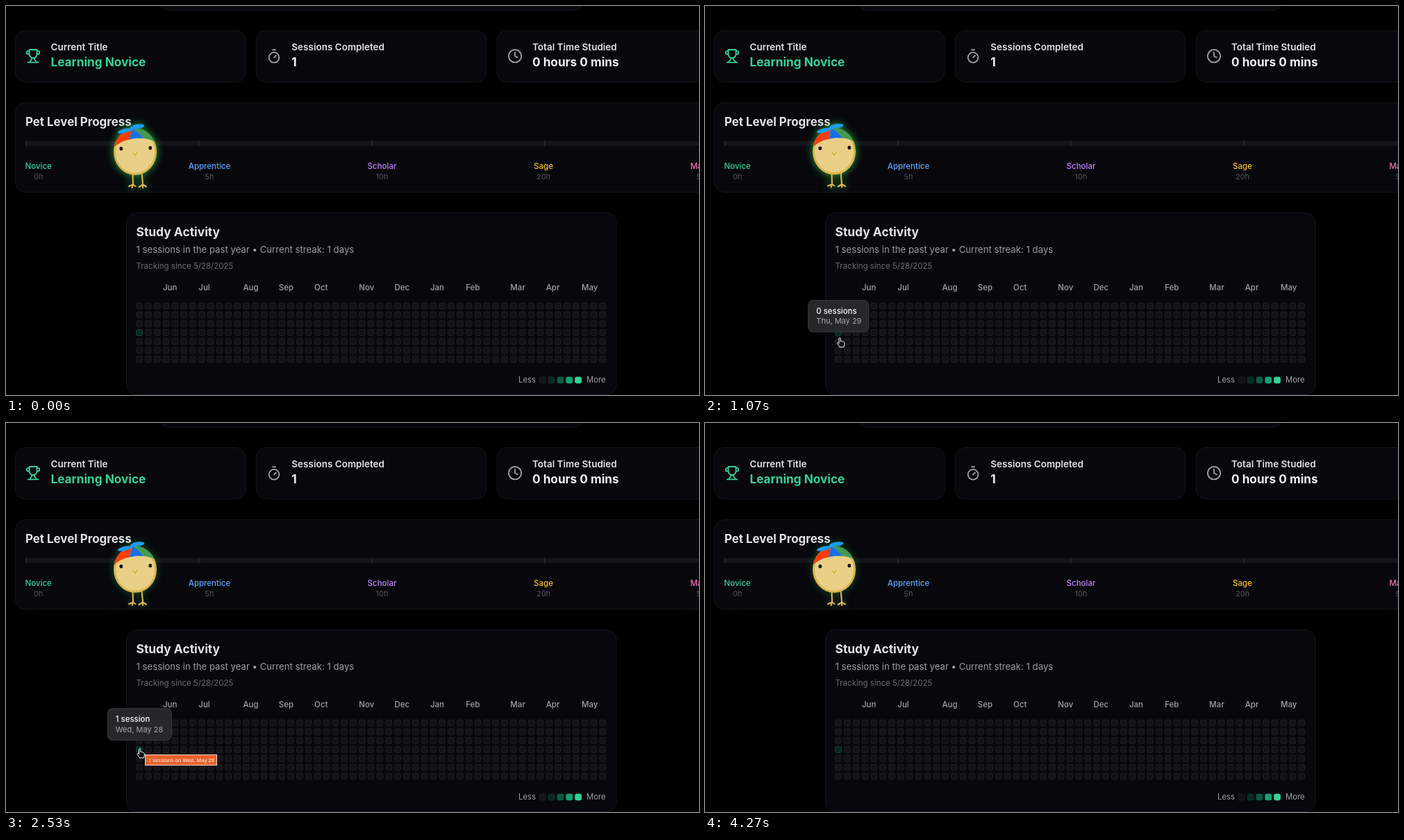
An HTML page for the animation above (4.3 s loop, 998x561 px).

```html
<!DOCTYPE html>
<html lang="en">
<head>
<meta charset="utf-8">
<title>Study dashboard</title>
<style>
  html, body { margin: 0; width: 100%; height: 100%; overflow: hidden; background: #000; }
  svg { display: block; width: 998px; height: 561px; }
  text { font-family: Inter, "Open Sans", sans-serif; white-space: pre; }
  .card { fill: #07070c; stroke: #15151d; }
  .icon { fill: none; stroke-width: 2; stroke-linecap: round; stroke-linejoin: round; }
</style>
</head>
<body>
<svg id="stage" viewBox="0 0 998 561">
  <g id="cards"></g>
  <g id="icons">
    <g class="icon" stroke="#34d399" transform="translate(28 61.2) scale(.92)">
      <path d="M6 9H4.5a2.5 2.5 0 0 1 0-5H6M18 9h1.5a2.5 2.5 0 0 0 0-5H18M4 22h16M10 14.7V17c0 .5-.5 1-1 1.2C7.9 18.8 7 20.2 7 22M14 14.7V17c0 .5.5 1 1 1.2 1.1.6 2 2 2 3.8M18 2H6v7a6 6 0 0 0 12 0Z"/>
    </g>
    <g class="icon" stroke="#a1a1aa" transform="translate(375 61.4) scale(.92)">
      <path d="M10 2h4M12 14l3-3"/><circle cx="12" cy="14" r="8"/>
    </g>
    <g class="icon" stroke="#a1a1aa" transform="translate(722 61.2) scale(.92)">
      <path d="M12 6v6l4 2"/><circle cx="12" cy="12" r="10"/>
    </g>
  </g>
  <g id="labels"></g>
  <g id="grid"></g>

  <g id="pet">
    <g fill="none" stroke="#dcb54c" stroke-width="2.1" stroke-linecap="round" stroke-linejoin="round">
      <path d="M182.5 242L183 258.500M177 261L183 258.500L181.500 263M183 258.500L186.500 261"/>
      <path d="M195.500 241L197 258.500M191.500 262L197 258.500V263M197 258.500L202 261.500"/>
    </g>
    <ellipse cx="186" cy="211.300" rx="29.500" ry="32" fill="#e9d086" stroke="#d9b650" stroke-width="3"/>
    <path d="M155.800 204.500A31 33.500 0 0 1 182 177.700C180 183 179 188 178 193.500C169 195 162 199 155.800 204.500Z" fill="#fb3d0c"/>
    <path d="M182 177.700C180 183 179 188 178 193.500C185 191.500 191 191.300 198 192C194 185.500 189 181 182 177.700Z" fill="#1670e4"/>
    <path d="M182 177.700A31 33.500 0 0 1 213.800 196.500C209 193.700 204 192.500 198 192C194 185.500 189 181 182 177.700Z" fill="#449a50"/>
    <g fill="#1b9cf2">
      <ellipse cx="171" cy="181" rx="10.500" ry="3" transform="rotate(-14 171 181)"/>
      <ellipse cx="189.500" cy="174.700" rx="10" ry="3.200" transform="rotate(-8 189.500 174.700)"/>
      <circle cx="181" cy="177.500" r="2.300"/>
    </g>
    <ellipse cx="165.800" cy="206.800" rx="2.400" ry="2.700" fill="#161310"/>
    <ellipse cx="207.800" cy="205.800" rx="2.400" ry="2.700" fill="#161310"/>
    <path d="M183 213L185.800 216.500L188.700 212.700" fill="none" stroke="#d9ae43" stroke-width="1.600" stroke-linecap="round"/>
  </g>

  <g id="tip">
    <rect id="tipBox" height="45.500" rx="7" fill="#29292c" fill-opacity=".96" stroke="#3d3d42"/>
    <text id="tipHead" x="11.500" y="19.300" font-size="11.4" font-weight="500" fill="#fafafa"></text>
    <text id="tipDate" x="11.500" y="33.800" font-size="11" fill="#a7a7ae"></text>
  </g>
  <g id="hint">
    <rect x="200.500" y="478.500" width="103" height="15" fill="#e7632f" stroke="#f6d6c6"/>
    <text x="204.800" y="488.800" font-size="7.6" fill="#fff" style="font-family:'Noto Sans','Open Sans',sans-serif">1 sessions on Wed, May 28</text>
  </g>
  <g id="cursor" stroke="#fff" fill="#0a0a0a" stroke-linejoin="round">
    <path id="arrow" d="M0 0V11.500L2.700 9L4.500 13L6.300 12.200L4.500 8.300H8Z"/>
    <path id="hand" d="M-2-4.500C-2-6 .1-6 .2-4.500V-.3C.9-1.200 2-.9 2.200 0C3-.6 4-.2 4.200.6C5.100.3 5.800.9 5.800 1.900V4.500C5.800 6 4.800 6.500 4.800 8H-1.200C-1.500 6.200-4 4-4.600 2.600C-5 1.400-3.500.9-2.700 1.900L-2 2.700Z"/>
  </g>
</svg>
<script>
const NS = 'http://www.w3.org/2000/svg';
const LOOP = 4300;
const $ = id => document.getElementById(id);

function add(parent, tag, attrs, content) {
  const node = document.createElementNS(NS, tag);
  for (const key in attrs) node.setAttribute(key, attrs[key]);
  if (content) node.textContent = content;
  parent.append(node);
  return node;
}

function label(content, x, y, size, weight, fill, anchor = 'start') {
  add($('labels'), 'text', { x, y, 'font-size': size, 'font-weight': weight, fill, 'text-anchor': anchor }, content);
}

function card(x, y, width, height) {
  add($('cards'), 'rect', { class: 'card', x, y, width, height, rx: 14 });
}

card(220, -60, 612, 66);
for (let i = 0; i < 3; i++) card(13.5 + i * 346.8, 35.5, 331.5, 74);
card(13.5, 139.5, 1025, 129);
card(173.5, 298.5, 705.5, 262);

add($('cards'), 'rect', { x: 28, y: 195, width: 990, height: 6.5, rx: 3, fill: '#15151a' });
for (let i = 0; i < 4; i++)
  add($('cards'), 'rect', { x: 27.8 + i * 249, y: 194.3, width: 1.8, height: 8, fill: '#26262b' });

const stats = [
  ['Current Title', 'Learning Novice', 64.5, '#34d399'],
  ['Sessions Completed', '1', 411.3, '#f1f1f3'],
  ['Total Time Studied', '0 hours 0 mins', 758, '#f1f1f3']
];
for (const [name, value, x, fill] of stats) {
  label(name, x, 64, 13.5, 600, '#e4e4e7');
  label(value, x, 87.2, 17.2, 700, fill);
}

label('Pet Level Progress', 28, 172.7, 16.9, 700, '#e4e4e7');
const levels = [
  ['Novice', '0h', 46.7, '#34d399'],
  ['Apprentice', '5h', 293, '#60a5fa'],
  ['Scholar', '10h', 541.5, '#c084fc'],
  ['Sage', '20h', 774, '#fbbf24'],
  ['Master', '50h', 1004.5, '#f472b6']
];
for (const [name, hours, x, fill] of levels) {
  label(name, x, 235, 11.5, 500, fill, 'middle');
  label(hours, x, 249.5, 11, 400, '#55555e', 'middle');
}

label('Study Activity', 187.5, 331.5, 17.4, 700, '#e4e4e7');
label('1 sessions in the past year • Current streak: 1 days', 187.5, 355.5, 13.2, 400, '#9d9da6');
label('Tracking since 5/28/2025', 187.5, 379, 11.5, 400, '#6b6b74');

const STEP = 12.83;
const months = { Jun: 3, Jul: 7, Aug: 12, Sep: 16, Oct: 20, Nov: 25, Dec: 29, Jan: 33, Feb: 37, Mar: 42, Apr: 46, May: 50 };
for (const name in months) label(name, 187.5 + STEP * months[name], 409.7, 11.5, 500, '#a1a1aa');

function cell(cx, cy, fill, stroke) {
  add($('grid'), 'rect', { x: cx - 4.4, y: cy - 4.4, width: 8.8, height: 8.8, rx: 2, fill, stroke, 'stroke-width': .9 });
}
for (let col = 0; col < 53; col++)
  for (let row = 0; row < 7; row++) {
    const active = col === 0 && row === 3;
    cell(192 + col * STEP, 432.6 + row * 12.8, active ? '#052a20' : '#141417', active ? '#0c513b' : '#232327');
  }

label('Less', 738, 543.3, 11.3, 400, '#a1a1aa');
label('More', 836, 543.3, 11.3, 400, '#a1a1aa');
['#141417', '#06291f', '#0a5a43', '#10a574', '#34d399'].forEach((fill, i) =>
  cell(772.7 + i * 12.85, 539.5, fill, ['#232327', '#0b3d2e', '#0c6049', '#10a574', '#34d399'][i]));

// [time, values...]
const pointerPath = [
  [110, 905, 575], [300, 848, 486], [430, 714.5, 502], [650, 455, 501],
  [900, 212, 489], [1070, 195, 484], [1300, 195, 483], [1450, 194.5, 475],
  [1630, 194.5, 475], [2100, 193.5, 475], [2850, 193.5, 475], [3130, 150, 575]
];
const petPath = [[0, -1, .85], [430, -2, .9], [1070, -1.5, .85], [1630, 0, .6], [2530, 0, .4], [4300, 0, .4]];

// [from, to, centre, top, width, heading, date]
const tips = [
  [270, 490, 846.4, 424.5, 83, '0 sessions', 'Thu, May 21'],
  [960, 1380, 192.3, 424.5, 87, '0 sessions', 'Thu, May 29'],
  [1380, 2900, 192.3, 411.8, 92, '1 session', 'Wed, May 28']
];

function along(path, t) {
  if (t <= path[0][0]) return path[0].slice(1);
  for (let i = 1; i < path.length; i++) {
    const a = path[i - 1], b = path[i];
    if (t <= b[0]) {
      const k = (t - a[0]) / (b[0] - a[0]);
      return a.slice(1).map((v, j) => v + (b[j + 1] - v) * k);
    }
  }
  return path[path.length - 1].slice(1);
}

const show = (id, on) => $(id).setAttribute('visibility', on ? 'visible' : 'hidden');
const move = (id, x, y) => $(id).setAttribute('transform', `translate(${x} ${y})`);

function draw(t) {
  const [lift, glow] = along(petPath, t);
  move('pet', 0, lift);
  $('pet').style.filter = `drop-shadow(0 0 6px rgba(52,190,70,${glow}))`;

  const [x, y] = along(pointerPath, t);
  const onCell = (t > 250 && t < 340) || (t > 960 && t < 2900);
  move('cursor', x, y);
  show('arrow', !onCell);
  show('hand', onCell);

  const tip = tips.find(([from, to]) => t >= from && t < to);
  show('tip', tip);
  if (tip) {
    const [, , centre, top, width, heading, date] = tip;
    move('tip', centre - width / 2, top);
    $('tipBox').setAttribute('width', width);
    $('tipHead').textContent = heading;
    $('tipDate').textContent = date;
  }
  show('hint', t >= 2350 && t < 2900);
}

const start = performance.now();
function tick() {
  draw((performance.now() - start) % LOOP);
  requestAnimationFrame(tick);
}
draw(0);
requestAnimationFrame(tick);
</script>
</body>
</html>
```
